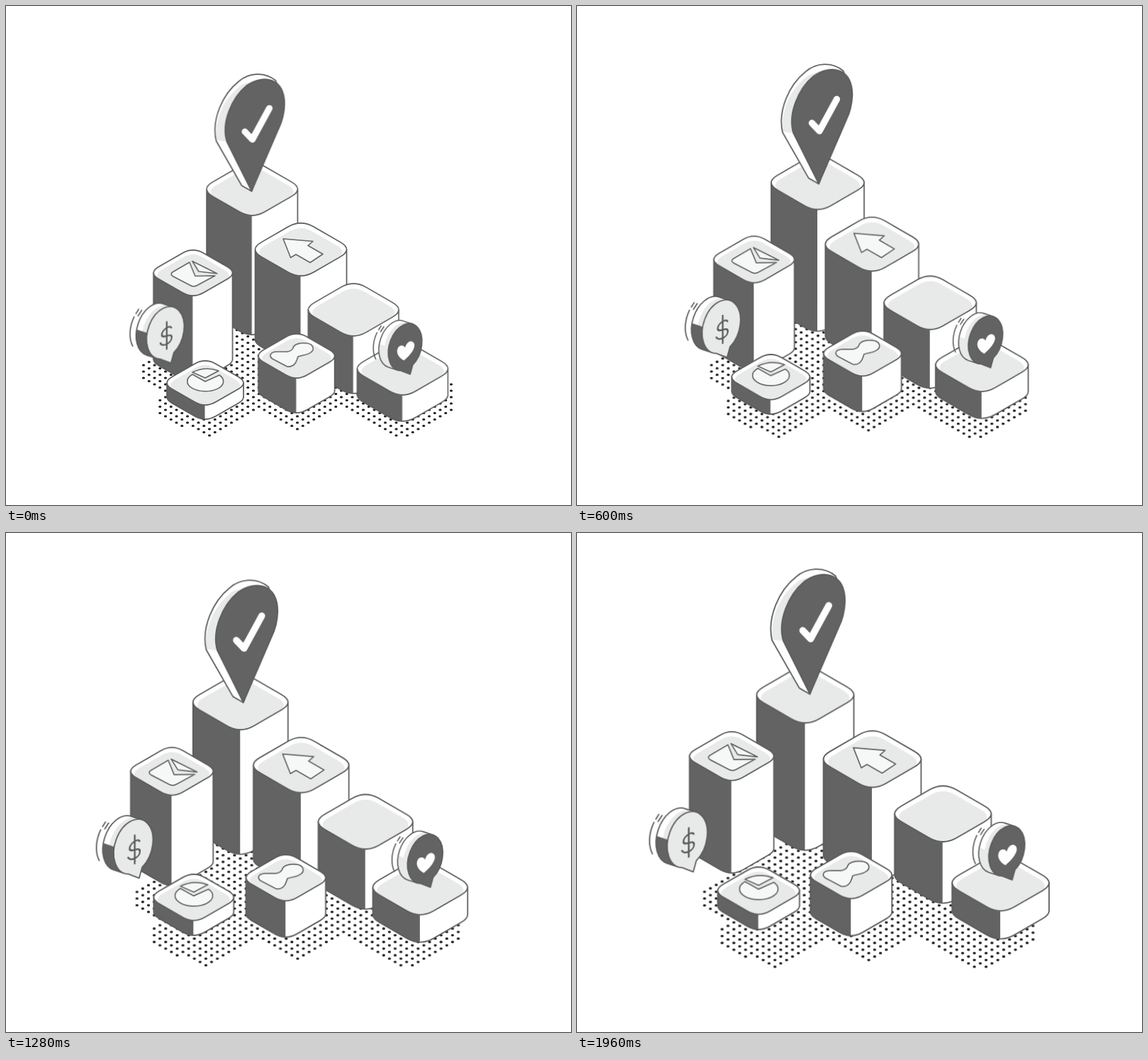
Animation, 797 px wide and 703 px high, one loop 2000 ms. Source, as an HTML page:

```html
<!DOCTYPE html>
<html lang="en">
<head>
<meta charset="utf-8">
<title>Isometric growth chart</title>
<style>
  html, body { margin: 0; width: 100%; height: 100%; overflow: hidden; background: #fff; }
  svg { display: block; }
  .line { stroke: #5c5c5c; stroke-width: 1.7; stroke-linejoin: round; stroke-linecap: round; }
  .white { fill: #fff; }
  .light { fill: #e8eae9; }
  .dark { fill: #636363; }
  .none { fill: none; }
  .icon { fill: #f6f7f7; stroke: #666; stroke-width: 1.6; stroke-linejoin: round; }
  .check { fill: none; stroke: #fff; stroke-width: 9; stroke-linecap: round; stroke-linejoin: round; }
  .dollar { fill: none; stroke: #5c5c5c; stroke-width: 2.3; stroke-linecap: round; }
  .dots { fill: none; stroke: #222; stroke-width: 3.1; stroke-linecap: round; }
  .drift { animation: drift 2s steps(50) infinite; }
  @keyframes drift {
    from { transform: translate(0px, 0px) scale(1); }
    to { transform: translate(var(--dx), var(--dy)) scale(1.069); }
  }
</style>
</head>
<body>
<svg id="stage" width="797" height="703" viewBox="0 0 797 703"></svg>
<script>
const SLOPE = 0.577;

const path = (cls, d) => `<path class="${cls}" d="${d}"/>`;

// A part sits at (x, y) and drifts by (dx, dy) over one loop while growing.
const part = (x, y, dx, dy, art) =>
  `<g transform="translate(${x} ${y})"><g class="drift" style="--dx:${dx}px;--dy:${dy}px">${art}</g></g>`;

// Rounded isometric box: half width w, corner cut c, height h, origin at the top face centre.
function block(w, c, h, icon = "") {
  const full = w + c / 2, e = w - c / 2;
  const kc = SLOPE * c, ke = SLOPE * e, tip = SLOPE * full, low = SLOPE * w;
  const top = `M${-e} ${kc}Q${-full} 0 ${-e} ${-kc}L${-c} ${-ke}Q0 ${-tip} ${c} ${-ke}` +
    `L${e} ${-kc}Q${full} 0 ${e} ${kc}L${c} ${ke}Q0 ${tip} ${-c} ${ke}Z`;
  const left = `M${-w} 0V${h}Q${-w} ${h + kc / 2} ${-e} ${h + kc}L${-c} ${h + ke}`;
  const body = `${left}Q0 ${h + tip} ${c} ${h + ke}L${e} ${h + kc}Q${w} ${h + kc / 2} ${w} ${h}V0Z`;
  const shade = `${left}Q${-c / 2} ${h + low} -0.5 ${h + low}V0Z`;
  return path("white", body) + path("dark", shade) + path("line none", body) +
    path("white", top) +
    `<g transform="translate(0 ${tip}) scale(.91) translate(0 ${-tip})">${path("light", top)}</g>` +
    path("line none", top) + icon;
}

// Thick speech disc, origin at the centre of its front face.
function bubble(size, face, sideShade, symbol) {
  const side = "M0 -38H-15.5A25 38 0 0 0 -15.5 38H0Z";
  return `<g transform="scale(${size})"><g transform="rotate(18)">` +
    path("white", side) +
    path("light", "M0 -38H-7A25 38 0 0 0 -31.4 8H-24.4Z") +
    path(sideShade, "M-39.9 8A25 38 0 0 0 -15.5 38H0A25 38 0 0 1 -24.4 8Z") +
    path("line none", side) +
    path("line " + face, "M5 37.2A25 38 0 1 1 20 22.8L20.7 38Z") +
    path("line none", "M-48.9 -8A25 38 0 0 0 -38 32M-41.5 -20L-44 -11M-46 -20L-47.8 -13") +
    `</g>${symbol}</g>`;
}

// Staggered floor dots inside the shadow outline.
function floorDots(cx, cy) {
  const area = new Path2D("M190 501L330 420L420 440L520 470L630 530V573L567 609H550L478 566" +
    "L418 596H396L353 570L297 605H272L212 571V555L222 548L190 528Z");
  const ctx = document.createElement("canvas").getContext("2d");
  let d = "";
  for (let j = 0; j < 44; j++) {
    for (let i = j % 2; i < 58; i += 2) {
      const x = 194 + 7.75 * i, y = 605 - 4.5 * j;
      if (ctx.isPointInPath(area, x, y)) d += `M${x - cx - 0.5} ${y - cy}h1`;
    }
  }
  return path("dots", d);
}

const envelope = path("icon", "M-5 -15L-29 -1Q-33 2 -28 5L-4 17.5Q1 20.5 6 17.5L31 4L3 4.5Z") +
  path("icon", "M-1 -16.5L34 1L8 -2Z");

const arrow = path("icon", "M-25 -15L17 -11.5L10 -5.5L31 6.5L13 18.5L-7 7L-14.5 11.5Z");

const pie = path("icon", "M0 -2L-18 -12A25.5 14 0 1 0 20 -11Z") +
  path("icon", "M0 -7L-18 -15Q0 -24 19 -17Z");

const person = path("icon", "M-37 -1Q-36 -6 -27 -6L-13 -6Q-7 -7 -5 -11C-4 -17 6 -19 14 -18" +
  "C24 -17 26 -9 20 -5C15 -1 7 -1 2 1Q1 5 -1 9Q-5 16 -13 15L-34 4Q-37 2 -37 -1Z");

const pin =
  path("line white", "M0 0L-14 -8L-50 -71C-57 -101 -41 -137 -18 -155C-4 -167 18 -169 34 -156L46 -123Z") +
  path("light", "M-35 -70L-49 -72C-53 -100 -40 -131 -14 -150L14 -160L-7 -149C-29 -131 -43 -96 -35 -70Z") +
  path("line dark", "M0 0L-35 -70C-43 -96 -29 -131 -7 -149C16 -165 46 -161 46.5 -123C46 -106 42 -96 38 -88Z") +
  path("check", "M-9.5 -84L1 -73L25 -117");

const dollar = `<g transform="translate(1 4) skewY(-18)">` +
  path("dollar", "M1 -19V19M7.5 -9C5 -14 -6 -10 -6 -3C-5 4 8 -3 8 5C8 13 -5 15 -8 8") + "</g>";

const heart = `<g transform="translate(1 5)">` +
  path("white", "M-3 16C-12 11 -16 3 -12 -4C-9 -9 -3 -8 -1 -4C1 -12 7 -16 11 -13C17 -9 13 3 -3 16Z") + "</g>";

document.getElementById("stage").innerHTML = [
  part(403, 515, 0, 0, floorDots(403, 515)),
  part(347.2, 258, -25.7, -30.6, block(64.2, 18, 168)),
  part(346.5, 261, -18.4, -34.7, pin),
  part(416, 343, 0.5, -25, block(64.5, 18, 127, arrow)),
  part(490.2, 428, 26.5, -33, block(63.8, 18, 81, "")),
  part(263.8, 376, -46.5, -62.9, block(55.7, 15, 122, envelope)),
  part(224.7, 460.5, -70.6, -29.1, bubble(1, "light", "dark", dollar)),
  part(409.8, 493, -23.5, -11.4, block(53.8, 15, 49, person)),
  part(559.5, 511, 38.8, -18.4, block(64, 18, 37)),
  part(563, 480.5, 44.1, -33.3, bubble(0.9, "dark", "light", heart)),
  part(281, 531, -25.3, -27.7, block(54, 15, 20, pie))
].join("");
</script>
</body>
</html>
```
